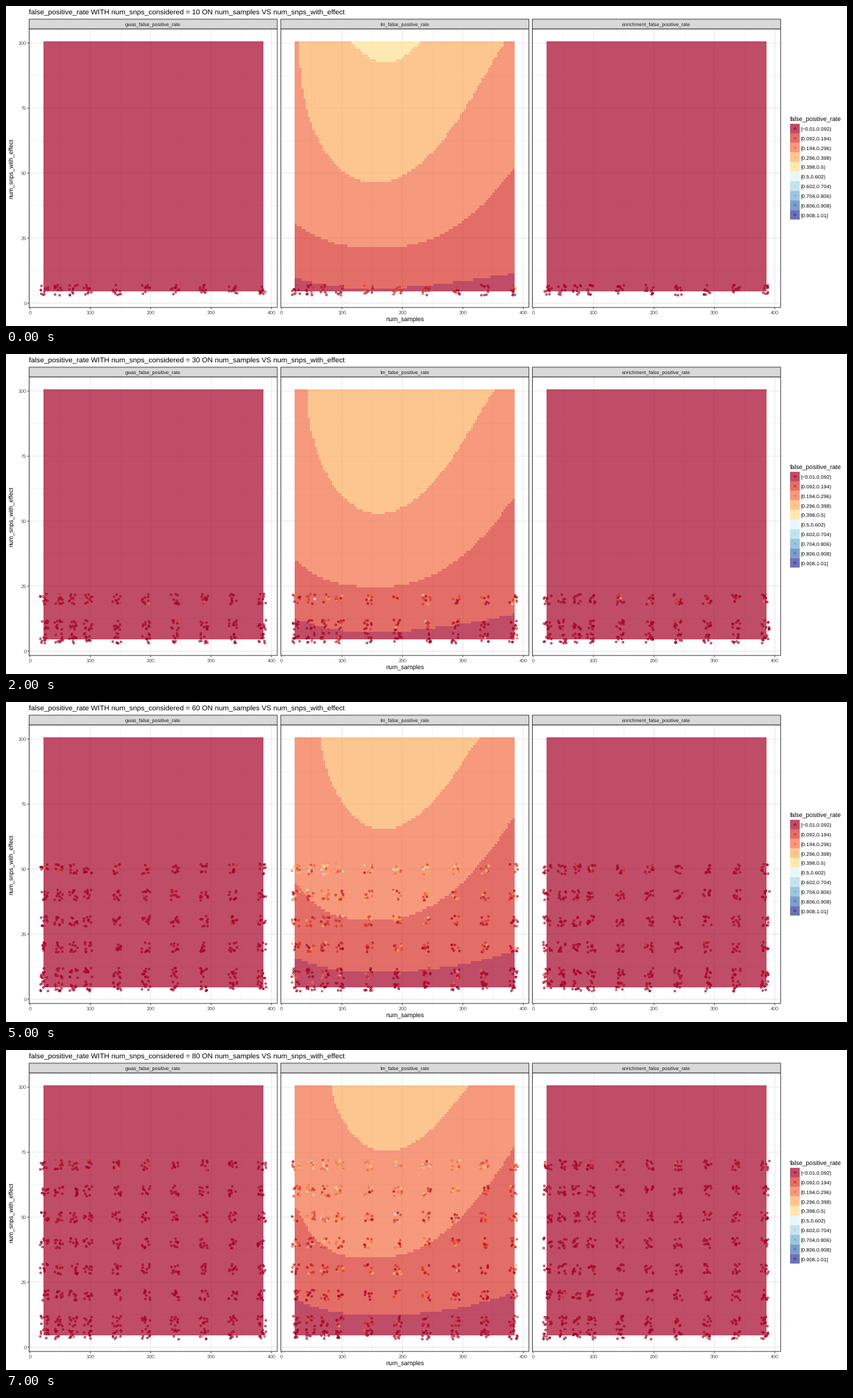
A matplotlib script that plays this animation: 1212x462 px, repeating every 8 s.

```python
import numpy as np
import matplotlib
import matplotlib.pyplot as plt
from matplotlib.animation import FuncAnimation
from matplotlib.colors import to_rgb
from matplotlib.patches import Rectangle

W, H, DPI = 1212, 462, 100
PX = 72 / DPI  # points per pixel
matplotlib.rcParams["font.family"] = "Liberation Sans"
matplotlib.rcParams["text.hinting"] = "none"

PALETTE = np.array([to_rgb(c) for c in (
    "#A50026", "#D73027", "#F46D43", "#FDAE61", "#FEE090",
    "#E0F3F8", "#ABD9E9", "#74ADD1", "#4575B4", "#313695")])
EDGES = np.round(-0.01 + 0.102 * np.arange(11), 3)
BREAKS = EDGES[1:-1]
ALPHA = 0.7
NAMES = ["gwas", "lm", "enrichment"]
GREY = "#333333"

# Panel geometry in pixels
LEFT, PITCH, PANEL_W = 33.3, 362.65, 357.7
STRIP_TOP, TOP, BOTTOM = 19, 33, 435.2
X_PAD, X_UNIT = 1.1, 0.8708
Y_ZERO, Y_UNIT = 429, 3.755

SAMPLES = 24 * np.r_[1:4, 4:17:2]
REPEATS = 10
COLS = np.linspace(24, 384, 100)
ROWS = np.arange(100, 4, -1)
HALF_COL = 180 / 99


def to_x(panel, u):
    return LEFT + PITCH * panel + X_PAD + X_UNIT * u


def to_y(v):
    return Y_ZERO - Y_UNIT * v


def valley(x, low, left, right, p, q, centre=160):
    """Curve rising by left and right from its low point to the data limits."""
    a = np.clip((centre - x) / (centre - 24), 0, None)
    b = np.clip((x - centre) / (384 - centre), 0, None)
    return low + left * a ** p + right * b ** q


def bowl(x, s):
    """Curve that reaches 100 at both rims and is out of reach beyond them."""
    left = 29.8 + 41.9 * s + 10.9 * s * s
    right = 369.3 - 59.6 * s
    low = 46.1 + 21.5 * s + 7.5 * s * s
    centre = 155 + 18 * s
    v = np.where(x < centre, (centre - x) / (centre - left),
                 (x - centre) / (right - centre))
    power = np.where(x < centre, 0.45 + 0.25 * s, 1.15)
    depth = np.clip(1 - v * v, 0, None) ** power
    return np.where(v > 1, 130, 100 - (100 - low) * depth)


def contours(x, k):
    """Heights where the lm surface crosses the first four breaks."""
    s = (k - 10) / 70
    return [
        valley(x, 5.3 + 7 * s, 4.4 + 1.7 * s, 6.1 + 2.6 * s,
               2.2 + 0.3 * s, 1.4 + 0.8 * s),
        valley(x, 21.2 + 12 * s + 1.1 * s * s, 9.2 + 10.5 * s * s,
               30.2 + 15 * s - 3 * s * s, 2.5 + s, 2.3 - 0.25 * s),
        bowl(x, s),
        92.3 + 46 * s + 7.7 * ((x - 173) / 55) ** 2]


def surface(k):
    band = sum((ROWS[:, None] >= edge).astype(int) for edge in contours(COLS, k))
    return PALETTE[band]


def cloud(panel, k, rng):
    """Jittered points of one panel: pixel positions and colour bands."""
    effects = [5, *range(10, k, 10)]
    x, y = (a.ravel() for a in np.meshgrid(np.repeat(SAMPLES, REPEATS), effects))
    newest = y == effects[-1]
    if panel == 1:
        edges = np.transpose(contours(x, k)[:3])
        mean = np.array([np.interp(v, [0, *e], [0.01, *BREAKS[:3]])
                         for v, e in zip(y, edges)])
        mean *= np.where(newest, 1.3, 1.05)
    else:
        mean = np.where(newest & (k > 10), 0.04, 0.01)
    rate = rng.gamma(16 * mean, 1 / 16)
    px = to_x(panel, x + rng.uniform(-7, 7, len(x)))
    py = to_y(y + rng.uniform(-2, 2, len(y)))
    return np.column_stack([px, py]), np.minimum(np.digitize(rate, BREAKS), 6)


def paint(dots, bands):
    for setter, alpha in ((dots.set_facecolor, 0.45), (dots.set_edgecolor, 0.85)):
        setter(np.column_stack([PALETTE[bands], np.full(len(bands), alpha)]))


def add_dots(z=3):
    return ax.scatter([], [], s=(2.7 * PX) ** 2, linewidths=0.85 * PX, zorder=z)


def label(x, y, s, size, color="black", **kw):
    return ax.text(x, y, s, fontsize=size * PX, color=color, **kw)


def line(xs, ys, color=GREY, width=0.9, z=4):
    ax.plot(xs, ys, color=color, lw=width * PX, zorder=z,
            solid_capstyle="butt", snap=False)


def box(x, y, w, h, face, edge="none", z=1):
    ax.add_patch(Rectangle((x, y), w, h, facecolor=face, edgecolor=edge,
                           lw=0.9 * PX, zorder=z, snap=False))


def add_panel(p):
    left = LEFT + PITCH * p
    right = left + PANEL_W
    for step, width in ((0.5, 0.5), (1, 1)):
        for n in np.arange(0, 4.01, step):
            gx, gy = to_x(p, 100 * n), to_y(25 * n)
            line([gx, gx], [TOP, BOTTOM], "#EBEBEB", width, 1)
            line([left, right], [gy, gy], "#EBEBEB", width, 1)
    extent = (to_x(p, 24 - HALF_COL), to_x(p, 384 + HALF_COL),
              to_y(4.5), to_y(100.5))
    flat = np.tile(PALETTE[0], (len(ROWS), len(COLS), 1))
    image = ax.imshow(flat, extent=extent, aspect="auto", alpha=ALPHA,
                      interpolation="nearest", zorder=2)
    box(left, TOP, PANEL_W, BOTTOM - TOP, "none", GREY, 4)
    box(left, STRIP_TOP, PANEL_W, TOP - STRIP_TOP, "#D9D9D9", GREY, 4)
    label((left + right) / 2, 29, NAMES[p] + "_false_positive_rate", 7.15,
          "#1A1A1A", ha="center", zorder=5)
    for u in range(0, 401, 100):
        tx = to_x(p, u)
        line([tx, tx], [BOTTOM, BOTTOM + 2.4])
        label(tx, 445, str(u), 7.15, "#4D4D4D", ha="center")
    return image, add_dots()


def add_legend():
    label(1130, 166.5, "false_positive_rate", 8.9)
    size = 13.83
    centres = 177 + size * np.arange(10)
    for i, cy in enumerate(centres):
        box(1130, cy - size / 2, size, size, (*PALETTE[i], ALPHA))
        close = "]" if i == 9 else ")"
        text = f"[{EDGES[i]:g},{EDGES[i + 1]:g}{close}".replace("-", "−")
        label(1145.1, cy + 2.6, text, 7.5)
    dots = add_dots()
    dots.set_offsets(np.column_stack([np.full(10, 1137), centres]))
    paint(dots, np.arange(10))


fig = plt.figure(figsize=(W / DPI, H / DPI), dpi=DPI, facecolor="white")
ax = fig.add_axes([0, 0, 1, 1])
ax.axis("off")

images, scatters = zip(*(add_panel(p) for p in range(3)))
for v in range(0, 101, 25):
    line([LEFT - 2.4, LEFT], [to_y(v)] * 2)
    label(29.3, to_y(v) + 2.6, str(v), 7.15, "#4D4D4D", ha="right")
label(575, 455.5, "num_samples", 8.9, ha="center")
label(8, 234.3, "num_snps_with_effect", 8.8, ha="center", va="center", rotation=90)
title = label(33, 12, "", 10.4)
add_legend()

ax.set_xlim(0, W)
ax.set_ylim(H, 0)


def update(i):
    k = 10 * (i + 1)
    rng = np.random.default_rng(400 + k)
    title.set_text(f"false_positive_rate WITH num_snps_considered = {k} "
                   "ON num_samples VS num_snps_with_effect")
    images[1].set_data(surface(k))
    for p, dots in enumerate(scatters):
        xy, bands = cloud(p, k, rng)
        dots.set_offsets(xy)
        paint(dots, bands)
    return [title, *images, *scatters]


anim = FuncAnimation(fig, update, frames=8, interval=1000, repeat=True,
                     repeat_delay=0, blit=False)
plt.show()
```
